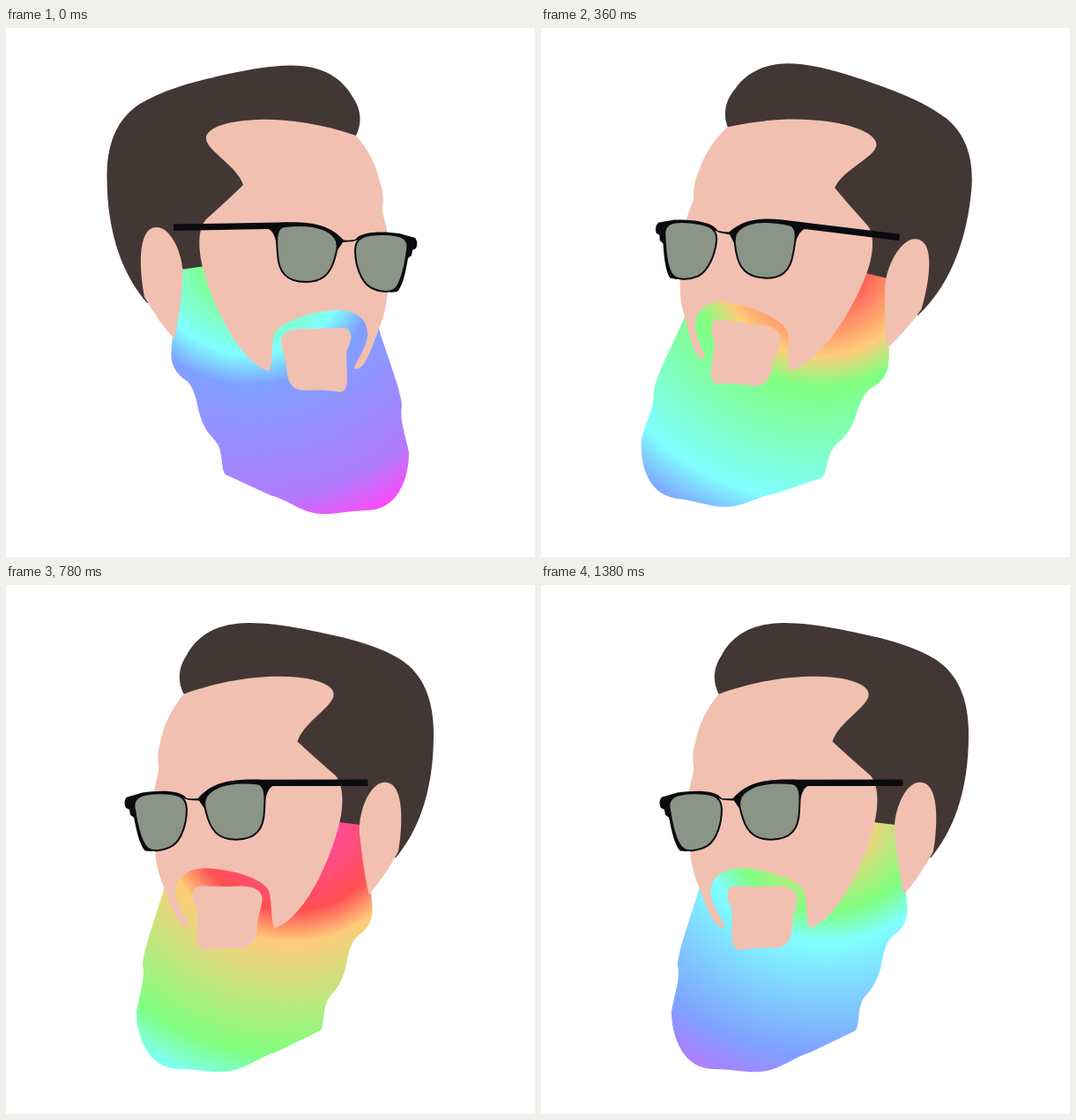
These frames come from a looping animation (600x600 px, 1.44 s). An HTML page:

```html
<!DOCTYPE html>
<html lang="en">
<head>
<meta charset="utf-8">
<title>Rainbow beard</title>
<style>
  html, body { margin: 0; height: 100%; overflow: hidden; background: #fff; }
  svg { display: block; width: 100%; height: 100%; }
  .skin { fill: #f1c0b1; }
  .frame { fill: #0a0b0f; }
  .lens { fill: #8a9487; stroke: #0a0b0f; stroke-width: 2; }
</style>
</head>
<body>
<svg viewBox="0 0 600 600">
  <defs>
    <radialGradient id="rainbow" gradientUnits="userSpaceOnUse" cx="277" cy="253" r="328">
      <stop offset=".15"/>
      <stop offset=".357"/>
      <stop offset=".463"/>
      <stop offset=".857"/>
      <stop offset="1"/>
    </radialGradient>
  </defs>
  <g id="head">
    <!-- hair -->
    <path fill="#423735" d="M160 312C129 276 114 226 114.5 165C115 125 130 100 152 86C172 74 193 67 215 61C240 55 285 43 322 42.5C360 42 382 58 393 78C403 92 404 108 397 122L300 150L230 268L215 280L190 300Z"/>
    <!-- beard -->
    <path fill="url(#rainbow)" d="M190 275L223 270.5L380 300L423 341C430 366 448 410 449 428C446 445 453 460 457 482C457 510 445 545 412 547C390 547 375 552 357 551C335 550 320 535 300 530L250 507C243 503 247 485 240 472C234 462 226 460 219 436C216 422 213 408 206 401C196 394 186 385 187.5 366C188 352 190 348 191 340Z"/>
    <!-- face, mouth, ear -->
    <path class="skin" d="M397 122C352 107 315 103 285 104C250 105 227 114 227 125C227 139 262 156 269 178Q258 189 227 217C217 228 218 252 223 271C235 318 268 382 299 389C303 378 301 360 304 348C307 336 340 321 378 320C403 321 411 335 410 350C408 364 396 380 395 386C405 390 412 372 423 341C430 325 433 308 433 290L433 235C431 220 427 213 427 205C428 198 428 185 425 178C420 155 411 138 397 122Z"/>
    <path class="skin" d="M312 356C312 346 322 341 336 341C355 342 365 340 384 340C392 342 393 352 389 360C384 368 387 380 387 398C387 408 383 413 379 413C362 410 352 411 336 411C320 409 319 395 318 385C317 372 313 366 312 356Z"/>
    <path class="skin" d="M157 305C152 280 147 226 171 226C188 226 202 260 200.5 283C198 310 196 330 191 353Q172 332 157 305Z"/>
    <!-- glasses -->
    <path class="frame" d="M190 222.5L310 220.5C345 219 366 222 383 240.5Q389 241 396 240C402 231 425 230 446 233L464 238Q468 243 465 250L461 252L460 258L456 261C453 278 450 292 444 299L436 300L450 240L400 240L394 242Q388 242.5 382 243L376 252L340 236L308 250C306 240 304 231 298 228L190 230Z"/>
    <path class="lens" d="M316 225C345 222 364 226 373 238C378 244 375 254 372 264C367 280 358 288 340 288C318 288 309 277 308 256C307 243 305 226 316 225Z"/>
    <path class="lens" d="M396 252C396 237 408 234 428 234C447 234 458 238 455 252C452 274 449 286 443 294C438 301 424 300 413 294C402 287 396 268 396 252Z"/>
  </g>
</svg>
<script>
  const STEP = 60, STEPS = 24;
  const colors = ['#80ff80', '#80ffff', '#7fa0ff', '#b07cff', '#ff48f8', '#ff4aa0', '#ff5052', '#ffcc7a'];
  const head = document.getElementById('head');
  const stops = document.querySelectorAll('stop');

  function draw(ms) {
    const n = Math.floor(ms / STEP) % STEPS;
    // Triangle wave: 0, 6, -6, 0 degrees, one degree per step
    const tilt = 6 - Math.abs((n + 6) % STEPS - 12);
    const mirrored = n % 8 >= 4;
    head.setAttribute('transform',
      `${mirrored ? 'translate(600) scale(-1 1) ' : ''}rotate(${-tilt} 300 200)`);
    stops.forEach((stop, k) => stop.setAttribute('stop-color', colors[(n + k) % colors.length]));
  }

  function tick() {
    draw(performance.now());
    requestAnimationFrame(tick);
  }
  tick();
</script>
</body>
</html>
```
